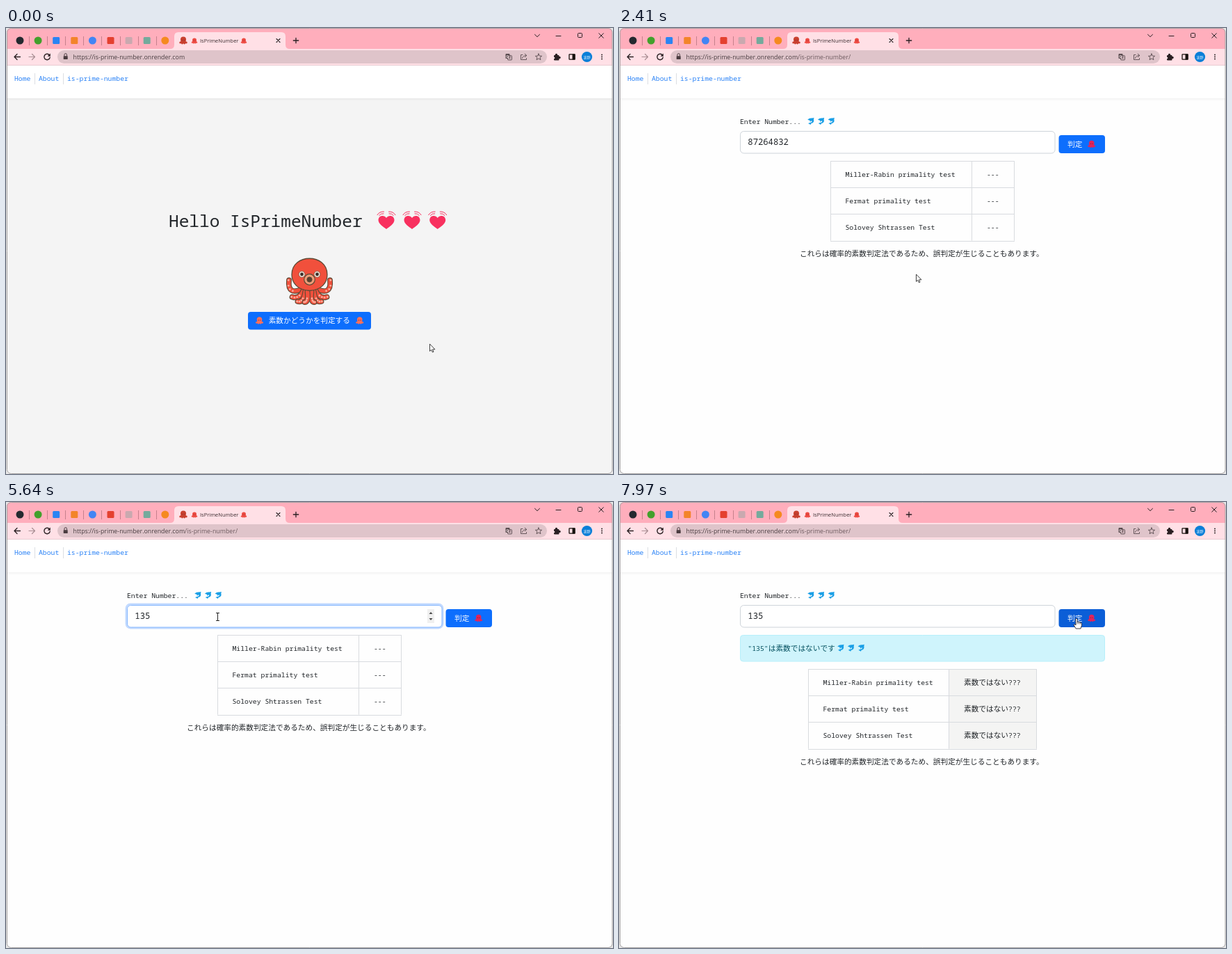
An HTML page with a canvas for the animation above (8000 ms loop, 873 px wide and 641 px high).

```html
<!DOCTYPE html>
<html lang="ja">
<head>
<meta charset="utf-8">
<title>IsPrimeNumber</title>
<style>
html, body { margin: 0; width: 100%; height: 100%; overflow: hidden; background: #e6e6e6; }
canvas { display: block; width: 873px; height: 641px; }
</style>
</head>
<body>
<canvas id="stage"></canvas>
<script>
const W = 873, H = 641, LOOP = 8000, TICK = 69;
const MONO = '"Noto Sans Mono", "Noto Sans CJK JP", monospace';
const JP = '"Noto Sans CJK JP", "Noto Sans CJK", sans-serif';
const UI = '"Open Sans", "Noto Sans", sans-serif';
const BLUE = [13, 110, 253], BLUE_HOVER = [11, 94, 215], INK = '#212529';
const SMALL = 9.78, FIELD = 12.22, TITLE = 24.45, KANJI = 10.67;

const canvas = document.getElementById('stage');
const dpr = window.devicePixelRatio || 1;
canvas.width = W * dpr;
canvas.height = H * dpr;
const c = canvas.getContext('2d');

const clamp = v => Math.max(0, Math.min(1, v));
const ramp = (t, a, b) => clamp((t - a) / (b - a));
const mix = (a, b, k) => `rgb(${a.map((v, i) => Math.round(v + (b[i] - v) * k))})`;
const ease = {
  in: k => k * k,
  out: k => 1 - (1 - k) ** 2,
  both: k => k * k * (3 - 2 * k),
  line: k => k
};

function text(s, x, y, size, color = INK, family = MONO, weight = 400) {
  c.font = `${weight} ${size}px ${family}`;
  c.fillStyle = color;
  c.fillText(s, x, y);
}

function rect(x, y, w, h, color) {
  c.fillStyle = color;
  c.fillRect(x, y, w, h);
}

function box(x, y, w, h, r, fill, stroke, lw = 1) {
  c.beginPath();
  c.roundRect(x, y, w, h, r);
  if (fill) { c.fillStyle = fill; c.fill(); }
  if (stroke) { c.strokeStyle = stroke; c.lineWidth = lw; c.stroke(); }
}

function disc(x, y, r, fill, stroke, lw = 1) {
  c.beginPath();
  c.arc(x, y, r, 0, Math.PI * 2);
  if (fill) { c.fillStyle = fill; c.fill(); }
  if (stroke) { c.strokeStyle = stroke; c.lineWidth = lw; c.stroke(); }
}

function path(d, x, y, { fill, stroke, lw = 1, s = 1 }) {
  const p = new Path2D(d);
  c.save();
  c.translate(x, y);
  c.scale(s, s);
  c.lineCap = c.lineJoin = 'round';
  if (fill) { c.fillStyle = fill; c.fill(p); }
  if (stroke) { c.strokeStyle = stroke; c.lineWidth = lw; c.stroke(p); }
  c.restore();
}

const line = (d, x, y, color = '#2a2023', lw = 1) => path(d, x, y, { stroke: color, lw });

// Small emoji, drawn around their centre
function miniOcto(x, y, color, s = 1) {
  disc(x, y - 1.3 * s, 3.5 * s, color);
  box(x - 3.2 * s, y, 6.4 * s, 3.6 * s, s, color);
  for (const k of [-1, 1]) {
    disc(x + 3.7 * k * s, y + 2.6 * s, 1.3 * s, color);
    disc(x + 1.4 * k * s, y + 3.5 * s, 1.2 * s, color);
    disc(x + 1.2 * k * s, y - .5 * s, .6 * s, '#8a2f2c');
  }
}

function dolphin(x, y) {
  path('M-4.8 -2.2 Q-2 -5 2 -4.4 L4.5 -5 L4 -2.8 Q5.2 2.2 .2 3.2 L-.4 5 L-4 3 L-1 1.9 Q2.6 1.2 1 -.8 L-1.4 1 L-1.4 -.9 Z', x, y, { fill: '#1a9fe6' });
}

const dolphins = (x, y) => [0, 1, 2].forEach(i => dolphin(x + i * 14.67, y));

function heart(x, y) {
  path('M0 12 C-4 9 -11.5 4.5 -11.5 -1 C-11.5 -8 -3 -9 0 -4 C3 -9 11.5 -8 11.5 -1 C11.5 4.5 4 9 0 12 Z', x, y, { fill: '#f8315f' });
  for (const m of [-1, 1]) {
    c.save();
    c.translate(x, y);
    c.scale(m, 1);
    line('M3.5 -13 Q10 -13.5 13 -8.3', 0, 0, '#f8315f', 1);
    line('M4 -10.2 Q8 -10.8 10.3 -7.6', 0, 0, '#f8315f', 1);
    c.restore();
  }
}

const ARMS = [
  [-9, 20, -32, 31, -29.5, 8],
  [-8, 21, -14, 36, -25, 32],
  [-6, 23, -8, 41, -17, 38.5],
  [-3, 24, -1, 40, -7, 39.5]
];

function bigOcto(x, y) {
  const edge = '#5d4a36', red = '#f1503c';
  c.save();
  c.translate(x, y);
  for (const m of [-1, 1]) {
    c.save();
    c.scale(m, 1);
    for (const [x0, y0, x1, y1, x2, y2] of ARMS) {
      const d = `M${x0} ${y0} Q${x1} ${y1} ${x2} ${y2}`;
      line(d, 0, 0, edge, 7.8);
      line(d, 0, 0, red, 5.6);
      for (let k = .4; k <= 1; k += .2) {
        const q = 1 - k;
        disc(q * q * x0 + 2 * q * k * x1 + k * k * x2 - .8,
             q * q * y0 + 2 * q * k * y1 + k * k * y2, 1.4, '#f9b09f');
      }
    }
    c.restore();
  }
  path('M-25.5 0 C-25.5 -31 25.5 -31 25.5 0 C25.5 12 17 22 0 23 C-17 22 -25.5 12 -25.5 0 Z', 0, 0, { fill: red, stroke: edge, lw: 1.3 });
  for (const e of [-11, 11]) {
    disc(e, -.5, 4.4, '#f3e6dc', edge, .6);
    disc(e, -.5, 2.4, '#3b3029');
  }
  disc(0, 7, 7.8, '#ed9c78', edge, 1.2);
  disc(0, 7, 3.7, '#5b4030', edge, .7);
  c.restore();
}

const TABS = ['#24292f', '#43a02c', '#2b84f3', '#f3842a', '#4285f4', '#e4402f', '#c9a9af', '#74aa9c', '#f58a1f'];
const SQUARE_TABS = [2, 3, 5, 6, 7];

function chrome(url) {
  rect(0, 0, W, H, '#e6e6e6');
  box(1, 0, 871, 640, 6, '#fefefe');
  c.beginPath();
  c.roundRect(1, 0, 871, 53, [6, 6, 0, 0]);
  c.save();
  c.clip();
  rect(0, 0, W, 30, '#ffaebc');
  rect(0, 30, W, 24, '#ffe0e6');
  c.restore();
  rect(2, 53, 870, 1, '#e9ccd2');

  TABS.forEach((color, i) => {
    const x = 20 + i * 26.1;
    if (SQUARE_TABS.includes(i)) box(x - 5, 13, 10, 10, 1.5, color);
    else disc(x, 18, 5.5, color);
    if (i < 8) rect(Math.round(x + 13), 12, 1, 13, '#c5808c');
  });

  path('M236 30 Q242 30 242 24 V12 Q242 6 248 6 H396 Q402 6 402 12 V24 Q402 30 408 30 Z', 0, 0, { fill: '#ffe0e6' });
  miniOcto(255, 18, '#c9402f', 1.15);
  miniOcto(271, 18.5, '#ee4a42', .85);
  text('IsPrimeNumber', 279, 21.3, 7.5, '#3a2c30', UI);
  miniOcto(342, 18.5, '#ee4a42', .85);
  line('M-2.5 -2.5 L2.5 2.5 M2.5 -2.5 L-2.5 2.5', 391.5, 18, '#2a2023', 1.1);
  line('M-3.7 0 H3.7 M0 -3.7 V3.7', 417, 18, '#2a2023', 1.3);
  line('M-3.5 -1.7 L0 1.7 L3.5 -1.7', 764, 11);
  line('M-3.5 0 H3.5', 794.5, 11.5);
  box(822.5, 7.5, 6, 6, 1, null, '#2a2023');
  line('M-3.3 -3.3 L3.3 3.3 M3.3 -3.3 L-3.3 3.3', 856, 11);

  const back = 'M4.5 0 H-4 M0 -4 L-4 0 L0 4';
  line(back, 16, 41.5, '#2a2023', 1.3);
  c.save();
  c.translate(37.5, 41.5);
  c.scale(-1, 1);
  line(back, 0, 0, '#a88d93', 1.2);
  c.restore();
  line('M3.5 -2.5 A4.2 4.2 0 1 0 4.2 .8', 59, 41.5, '#2a2023', 1.4);
  path('M4.8 -5 V-.8 H.6 Z', 59, 41.5, { fill: '#2a2023' });

  box(74, 32, 704, 19, 9.5, '#dfc4ca');
  box(82.7, 40.2, 6, 4.8, .6, '#4a3b3f');
  line('M-1.8 0 V-1.5 A1.8 1.8 0 0 1 1.8 -1.5 V0', 85.7, 40, '#4a3b3f');
  const host = 'https://is-prime-number.onrender.com';
  text(host, 96.5, 45, 8.83, '#4a3d41', UI);
  text(url, 96.5 + c.measureText(host).width, 45, 8.83, '#6d5a5f', UI);

  const grey = '#594a4e';
  box(718.5, 37, 6, 7, 1, grey);
  box(721.5, 39.5, 6, 6.5, 1, '#dfc4ca', grey, .9);
  line('M-1.5 -1.5 H1.5 M0 -2.2 V-1.5 M1 -1.5 L-1.3 1.8 M-1 -.5 L1.4 1.8', 724.5, 42.8, grey, .7);
  text('G', 719.3, 43, 5, '#eadadd', UI, 700);
  line('M-1.5 -3 H-4 V4 H4 V2 M-2 2 Q-1.5 -2 4 -2 M1.7 -4.3 L4.3 -2 L1.7 .3', 744.5, 41.5, grey, .9);
  line('M0 -4.5 L1.3 -1.4 L4.6 -1.2 L2.1 .9 L2.9 4.2 L0 2.4 L-2.9 4.2 L-2.1 .9 L-4.6 -1.2 L-1.3 -1.4 Z', 766, 41.5, grey, .9);
  box(788, 39, 7.5, 7.5, 1, '#2a2023');
  disc(791.5, 38.5, 1.7, '#2a2023');
  disc(796, 42.5, 1.7, '#2a2023');
  disc(788, 43, 1.3, '#ffe0e6');
  box(810, 37.8, 8, 7.4, .5, null, '#17120f', 1.3);
  rect(814.5, 37.5, 4, 8, '#17120f');
  disc(835.5, 41.5, 7.6, '#0b7fd8');
  text('波野', 830.5, 43.5, 5, '#e4f2ff', JP);
  [-3, 0, 3].forEach(d => disc(857, 41.5 + d, .95, '#2a2023'));
}

function navbar(home) {
  if (home) rect(2, 101, 870, 539, '#f4f4f4');
  const g = c.createLinearGradient(0, 100, 0, 105);
  g.addColorStop(0, 'rgba(0,0,0,.06)');
  g.addColorStop(1, 'rgba(0,0,0,0)');
  rect(2, 101, 870, 4, g);
  rect(2, 54, 870, 47, '#fff');
  const link = '#2a82f6';
  text('Home', 12, 76.3, SMALL, link, MONO, 500);
  text('About', 47, 76.3, SMALL, link, MONO, 500);
  text('is-prime-number', 88, 76.3, SMALL, link, MONO, 500);
  rect(41, 65, 1, 16, '#dcdfe3');
  rect(82, 65, 1, 16, '#dcdfe3');
}

function homePage(t) {
  text('Hello IsPrimeNumber', 234, 286, TITLE);
  [547, 584, 620.7].forEach(x => heart(x, 277));
  bigOcto(436.5, 354.5);
  box(348, 408, 177, 25.5, 4, mix(BLUE, BLUE_HOVER, ramp(t, 1080, 1230)));
  miniOcto(364.5, 420.5, '#f8705c', 1.08);
  text('素数かどうかを判定する', 377.7, 424.4, KANJI, '#fff', JP);
  miniOcto(508.7, 420.5, '#f8705c', 1.08);
}

function table(x, y, split, w, cells) {
  const rowH = 38.2, border = '#d8dbdf';
  if (cells.shade) rect(split, y, x + w - split, rowH * 3, '#f4f4f3');
  for (let i = 0; i < 4; i++) rect(x, Math.round(y + i * rowH), w, 1, border);
  [x, split, x + w - 1].forEach(v => rect(v, y, 1, rowH * 3, border));
  ['Miller-Rabin primality test', 'Fermat primality test', 'Solovey Shtrassen Test'].forEach((name, i) => {
    const by = y + 22.6 + i * rowH;
    text(name, x + 21.5, by, SMALL);
    cells.draw(split + 22, by);
  });
}

const pending = { draw: (x, y) => text('---', x, y, SMALL) };
const verdict = {
  shade: true,
  draw(x, y) {
    text('素数ではない', x, y, KANJI, INK, JP);
    text('???', x + KANJI * 6, y, SMALL);
  }
};

// What the field holds and whether its caret shows
function typed(t) {
  if (t < 4780) return '87264832';
  return '135'.slice(0, t < 4980 ? 1 : t < 5110 ? 2 : 3);
}

function caretOn(t) {
  if (t < 3040 || t >= 7470 || (t >= 4120 && t < 4780)) return false;
  if (t < 4120) return t < 3660;
  return t < 5110 || Math.floor((t - 5110) / 530) % 2 === 0;
}

function formPage(t, p) {
  const done = t >= 7900;
  const focus = ramp(t, 3040, 3260) * (1 - ramp(t, 7470, 7640));
  text('Enter Number...', 174, 138, SMALL);
  dolphins(276, 134);

  if (focus > 0) box(172.9, 146.9, 455.2, 34.2, 6, null, `rgba(13,110,253,${.25 * focus})`, 2.7);
  box(174.5, 148.5, 452.5, 31.5, 5, '#fff', mix([206, 212, 218], [134, 183, 254], focus));

  const s = typed(t), adv = FIELD * .6;
  const picked = t >= 4120 && t < 4780;
  if (picked) rect(185, 155, adv * s.length, 19, '#0078d7');
  text(s, 185.3, 168.2, FIELD, picked ? '#fff' : INK);
  if (caretOn(t)) rect(Math.floor(185.3 + adv * s.length), 156, 1, 15, '#000');

  if (t < 7470 && (t >= 3040 || inField(p))) {
    rect(606, 154, 10, 20, '#f0f0f0');
    path('M-2.5 1.5 L0 -1.5 L2.5 1.5 Z', 611, 159.5, { fill: '#4a4a4a' });
    path('M-2.5 -1.5 L0 1.5 L2.5 -1.5 Z', 611, 168.5, { fill: '#4a4a4a' });
  }

  box(632.5, 154, 66.5, 26, 4, mix(BLUE, BLUE_HOVER, ramp(t, 7080, 7230)));
  text('判定', 645, 171, KANJI, '#fff', JP);
  miniOcto(679.7, 167, '#e0245e', 1.08);

  if (done) {
    box(174.5, 191.5, 524, 37.5, 4, '#cff4fc', '#b6effb');
    text('"135"', 185.3, 213.5, SMALL, '#055160');
    text('は素数ではないです', 214.8, 213.5, KANJI, '#055160', JP);
    dolphins(319, 209.7);
    table(272, 240, 474, 329, verdict);
  } else {
    table(304, 191, 507, 265, pending);
  }
  text('これらは確率的素数判定法であるため、誤判定が生じることもあります。', 260, done ? 377 : 327.7, KANJI, INK, JP);
}

function status(t) {
  c.globalAlpha = ramp(t, 1120, 1260) * (1 - ramp(t, 1590, 1740));
  if (c.globalAlpha > 0) {
    box(2, 626, 211, 14, [0, 3, 0, 0], '#ffb6c3');
    text('https://is-prime-number.onrender.com/is-prime-number/', 4.5, 635.8, 7.6, '#6a4e55', UI);
  }
  c.globalAlpha = 1;
}

// Pointer track: time, x, y, easing towards the point
const TRACK = [
  [0, 609, 454, 'line'],
  [640, 609, 454, 'line'],
  [1055, 505, 430.5, 'both'],
  [1469, 470, 420, 'out'],
  [2131, 470, 420, 'line'],
  [2959, 304, 165, 'both'],
  [6101, 304, 165, 'line'],
  [6515, 420, 151, 'in'],
  [6929, 597, 160, 'line'],
  [7270, 658, 167, 'out'],
  [LOOP, 658, 167, 'line']
];

function pointer(t) {
  const starts = [710, 2200, 6170].filter(s => s <= t);
  const base = starts.length ? starts[starts.length - 1] : 0;
  const q = base + Math.floor((t - base) / TICK) * TICK;
  const i = TRACK.findIndex(k => k[0] > q);
  const [t0, x0, y0] = TRACK[i - 1], [t1, x1, y1, how] = TRACK[i];
  const k = ease[how](ramp(q, t0, t1));
  return { x: x0 + (x1 - x0) * k, y: y0 + (y1 - y0) * k };
}

const inside = (p, x, y, w, h) => p.x >= x && p.x <= x + w && p.y >= y && p.y <= y + h;
const inField = p => inside(p, 174, 148, 453, 32);

function cursor(p, home) {
  const onButton = home ? inside(p, 348, 408, 177, 26) : inside(p, 632, 154, 67, 26);
  if (onButton) {
    path('M-1.2 1 Q0 -.8 1.2 1 V5.5 Q2.4 4.4 3.4 5.8 Q4.6 4.8 5.5 6.3 Q7.3 5.8 7.4 8 V10.5 L6 15 H-.8 L-4 9.8 Q-4 7.8 -1.2 9.5 Z', p.x, p.y, { fill: '#fff', stroke: '#26262e', lw: .9 });
    line('M1.2 5.5 V8 M3.4 6 V8 M5.4 6.5 V8.2', p.x, p.y, '#26262e', .7);
  } else if (!home && inField(p)) {
    line('M-2 -5.5 H2 M0 -5.5 V5.5 M-2 5.5 H2', Math.round(p.x) + .5, p.y, '#222');
  } else {
    path('M.5 .5 V10.5 L2.8 8.5 L4.4 12 L6 11.3 L4.5 7.9 H7.6 Z', p.x, p.y, { fill: '#fff', stroke: '#2b2b2b', lw: .9 });
  }
}

function draw(t) {
  const home = t < 1540, p = pointer(t);
  c.setTransform(dpr, 0, 0, dpr, 0, 0);
  chrome(home ? '' : '/is-prime-number/');
  navbar(home);
  if (home) homePage(t);
  else formPage(t, p);
  status(t);
  box(1.5, .5, 870.5, 640, 6, null, '#a3a0a1');
  cursor(p, home);
}

const begin = performance.now();
function tick() {
  draw((performance.now() - begin) % LOOP);
  requestAnimationFrame(tick);
}
tick();
</script>
</body>
</html>
```
